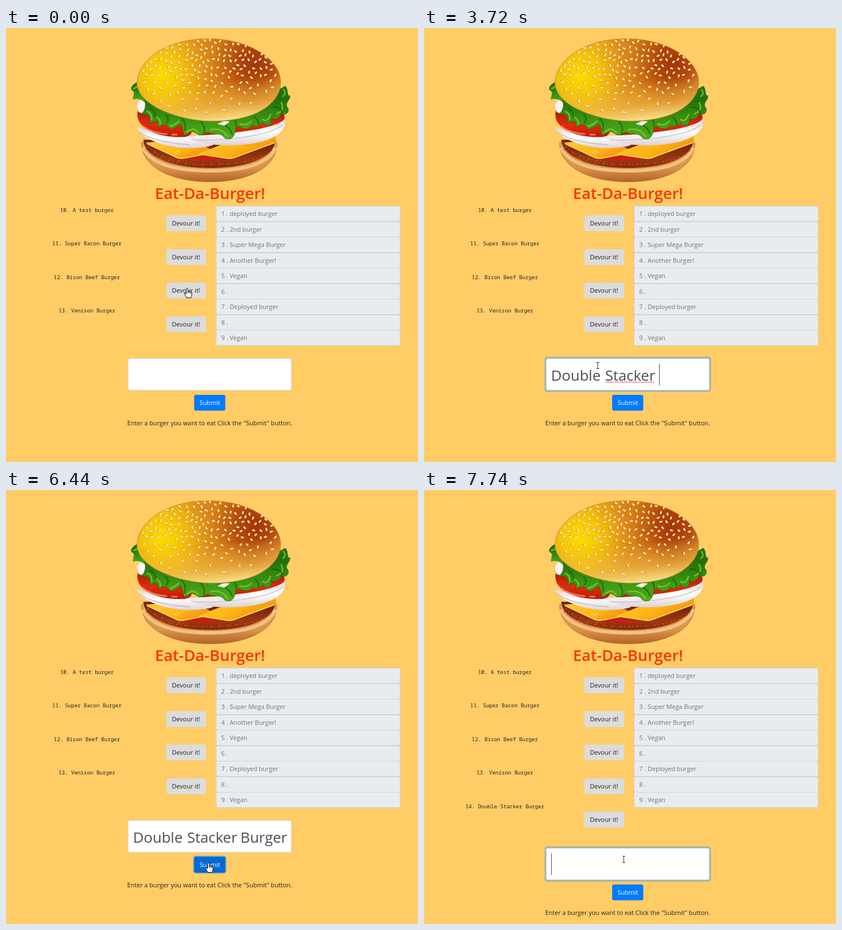
These frames come from a looping animation (729 by 769 pixels, 8000 ms). An HTML page:

```html
<!DOCTYPE html>
<html lang="en">
<head>
<meta charset="utf-8">
<title>Eat-Da-Burger!</title>
<style>
  html, body { margin: 0; width: 100%; height: 100%; overflow: hidden; background: #ffcc66; }
  svg { display: block; width: 729px; height: 769px; }
  text { font-family: "Open Sans", "Noto Sans", sans-serif; font-size: 11.04px; fill: #212529; white-space: pre; }
  text.title { font-size: 27.7px; font-weight: 600; fill: #ff3300; }
  text.mono { font-family: "Noto Sans Mono", "DejaVu Sans Mono", monospace; font-size: 9.3px; }
  text.item { fill: #6c757d; }
  text.typed { font-size: 26px; fill: #495057; }
  .mid { text-anchor: middle; }
</style>
</head>
<body>
<svg id="stage" viewBox="0 0 729 769" xmlns="http://www.w3.org/2000/svg">
  <defs>
    <linearGradient id="crust" x1="0" x2="1" y1=".6" y2=".5">
      <stop offset="0" stop-color="#e3a02c"/><stop offset=".2" stop-color="#efb51c"/>
      <stop offset=".5" stop-color="#dc8a18"/><stop offset=".8" stop-color="#c4600f"/>
      <stop offset="1" stop-color="#d8862c"/>
    </linearGradient>
    <radialGradient id="glow" gradientUnits="userSpaceOnUse" cx="276" cy="84" r="85">
      <stop offset="0" stop-color="#fbdc00"/><stop offset=".4" stop-color="#f8cd00" stop-opacity=".8"/>
      <stop offset="1" stop-color="#f5b800" stop-opacity="0"/>
    </radialGradient>
    <radialGradient id="toast" gradientUnits="userSpaceOnUse" cx="442" cy="62" r="78">
      <stop offset="0" stop-color="#a33407"/><stop offset=".4" stop-color="#ab3f09" stop-opacity=".8"/>
      <stop offset="1" stop-color="#c05a10" stop-opacity="0"/>
    </radialGradient>
    <linearGradient id="pale" gradientUnits="userSpaceOnUse" x1="352" x2="360" y1="98" y2="165">
      <stop offset="0" stop-color="#f5c040" stop-opacity="0"/>
      <stop offset=".6" stop-color="#f0bc4a" stop-opacity=".6"/>
      <stop offset="1" stop-color="#f8dc84"/>
    </linearGradient>
    <linearGradient id="base" x2="0" y2="1">
      <stop offset="0" stop-color="#e0a055"/><stop offset=".65" stop-color="#dc924a"/>
      <stop offset="1" stop-color="#b2642c"/>
    </linearGradient>
    <linearGradient id="meat" x2="0" y2="1">
      <stop offset=".2" stop-color="#7a2409"/><stop offset=".7" stop-color="#9c3810"/>
      <stop offset="1" stop-color="#84280a"/>
    </linearGradient>
    <linearGradient id="cheese" x2="1" y2=".6">
      <stop offset="0" stop-color="#ffcf3a"/><stop offset=".6" stop-color="#ffb515"/>
      <stop offset="1" stop-color="#f08f08"/>
    </linearGradient>
    <linearGradient id="tomato" x2="0" y2="1">
      <stop offset="0" stop-color="#9c1405"/><stop offset=".6" stop-color="#e42a0e"/>
      <stop offset="1" stop-color="#bf1a06"/>
    </linearGradient>
    <linearGradient id="onion" x2="0" y2="1">
      <stop offset="0" stop-color="#d9d0d6"/><stop offset=".5" stop-color="#ffffff"/>
      <stop offset="1" stop-color="#dcd2d8"/>
    </linearGradient>
    <linearGradient id="leaf" x2="0" y2="1">
      <stop offset=".25" stop-color="#24700a"/><stop offset=".7" stop-color="#3f9a14"/>
      <stop offset="1" stop-color="#55aa1c"/>
    </linearGradient>
  </defs>
  <rect width="729" height="769" fill="#ffcc66"/>

  <g id="burger">
    <path fill="url(#base)" stroke="#a8642c" stroke-width=".8" d="M240 203C239 245 290 272.5 361 272.5S481 245 479 203Z"/>
    <path fill="none" stroke="#f0c282" stroke-width="6" d="M242 212C258 245 312 253 361 253S462 245 477 212"/>
    <path fill="url(#meat)" d="M243 198C246 232 300 248 361 248S475 232 477 198Z"/>
    <path fill="none" stroke="#c05526" stroke-width="2.500" stroke-dasharray="5 3 2 5" opacity=".7" d="M247 214C266 238 320 243 361 242S456 238 473 214M250 209C270 230 300 235 320 237"/>
    <path fill="#c9200a" d="M308 232L350 218L386 231Q348 238 308 232Z"/>
    <path fill="url(#cheese)" d="M247 203L302 230Q308 233 318 231L372 220L330 198Z"/>
    <path fill="none" stroke="#ffe070" stroke-width="1.500" d="M249 205L303 230Q309 232 318 230L350 224M296 219l8 4M302 217l7 4"/>
    <path fill="url(#cheese)" d="M340 223L392 231.500Q400 233 408 229L478 203L476 186L398 200Z"/>
    <path fill="none" stroke="#ffe070" stroke-width="1.500" d="M342 223.500L392 231Q400 232 408 228L476 203"/>
    <path fill="url(#onion)" d="M231 174C236 197 290 217 340 212C374 210 375 203 360 190C310 194 255 186 231 174Z"/>
    <path fill="none" stroke="#b9adb2" stroke-width="1.200" d="M236 184Q262 203 326 207"/>
    <path fill="url(#tomato)" d="M233 148C227 178 270 196 318 193C334 190 331 172 322 164L240 138Z"/>
    <path fill="none" stroke="#ff8a68" stroke-width="3" stroke-linecap="round" opacity=".8" d="M242 174Q258 186 284 188M294 189l8 0"/>
    <path fill="url(#tomato)" d="M340 190C430 190 493 175 493 158L490 146L400 160Z"/>
    <path fill="url(#onion)" d="M318 192C340 209 400 211 440 204C480 197 497 180 494 161C478 176 430 186 318 192Z"/>
    <path fill="none" stroke="#c3b8bf" stroke-width="1.200" d="M328 198C380 201 462 193 490 172"/>
    <path fill="#faf5f3" stroke="#d9cfca" stroke-width=".7" d="M231 136L240 125L266 140L252 154L235 149Z"/>
    <path fill="url(#leaf)" d="M238 94C228 96 219 104 222 110C231 114 223 121 225 127C233 124 240 126 248 134L240 96Z"/>
    <path id="frill" fill="url(#leaf)" stroke="#236a08" stroke-width=".8" d="M244 120C248 136 248 146 238 153C250 152 258 154 253 170C264 162 272 164 268 176C278 170 284 168 290 179C296 180 303 174 309 170C315 178 312 187 317 190C325 182 331 182 339 188C347 192 352 186 358 184C366 192 378 182 387 195C395 199 402 196 405 186C408 182 402 178 412 174C420 180 430 181 436 172C442 177 450 174 454 167C460 176 472 174 469 160C477 164 486 160 487 151C494 156 502 150 499 142C491 133 504 128 502 120C496 121 500 108 494 103Q484 110 470 112Z"/>
    <path fill="none" stroke="#86cf38" stroke-width="2.500" stroke-linecap="round" opacity=".75" d="M250 148Q258 150 258 162M266 158Q274 162 273 170M291 174Q300 171 306 165M321 184Q332 174 340 185M362 180Q382 176 392 192M414 170Q426 174 434 165M454 162Q463 168 468 153M479 152Q494 146 487 132M490 121Q497 116 491 109M226 107Q231 106 234 101"/>
    <path fill="none" stroke="#165c05" stroke-width="2.500" stroke-linecap="round" opacity=".65" d="M255 142Q266 150 264 158M283 154Q290 162 284 168M311 160Q320 170 316 182M345 166Q354 176 350 186M376 168Q397 174 400 188M404 162Q408 168 407 175M440 158Q448 164 447 172M472 140Q486 140 489 150"/>
    <path fill="#f8f2ee" d="M374 170Q386 163 396 166L386 173Z"/>
    <g id="bun"></g>
  </g>

  <g id="page">
    <text class="title mid" x="361" y="303">Eat-Da-Burger!</text>
    <g id="rows"></g>
    <g id="list"></g>
  </g>

  <g id="form">
    <rect id="ring" x="213.300" y="582.400" width="294.500" height="62.600" rx="5" fill="#007bff" fill-opacity=".3"/>
    <rect id="field" x="216" y="585.500" width="289" height="56.500" rx="3" fill="#fff"/>
    <text id="typed" class="typed" y="625"></text>
    <path id="squiggle" fill="none" stroke="#e0333c" stroke-width="1"/>
    <rect id="caret" y="595" width="1" height="38" fill="#495057"/>
    <rect id="halo" x="331" y="648" width="59" height="31.500" rx="5" fill="#007bff" fill-opacity=".5"/>
    <rect id="submit" x="333" y="650" width="55" height="28" rx="3"/>
    <text class="mid" x="360.700" y="668" style="fill:#fff">Submit</text>
    <text x="214.500" y="703.700">Enter a burger you want to eat Click the "Submit" button.</text>
  </g>

  <g id="pointer">
    <path id="hand" fill="#fff" stroke="#000" stroke-width="1" stroke-linejoin="round" d="M-2 1.500Q-2 0-.5 0T1 1.500V6Q2 5 3.300 5.600Q4 5 5.600 6.200Q7.500 5.800 7.700 7.800V12Q7.500 14 6.300 17H-1.500Q-2.500 14-5.500 10.500Q-6 8.500-4 9L-2 10.500ZM1 6V9M3.300 6V9M5.600 6.500V9"/>
    <path id="arrow" fill="#fff" stroke="#000" stroke-width=".9" d="M0 0V14L3.200 11L5.500 16L7.600 15L5.400 10.200H10Z"/>
    <path id="beam" fill="none" stroke="#333" stroke-width="1" d="M-2.500-5.500H2.500M0-5.500V5.500M-2.500 5.500H2.500"/>
  </g>
</svg>
<script>
const LOOP = 8000;
const $ = id => document.getElementById(id);

function add(parent, tag, attrs, text) {
  const el = document.createElementNS("http://www.w3.org/2000/svg", tag);
  for (const k in attrs) el.setAttribute(k, attrs[k]);
  if (text) el.textContent = text;
  parent.appendChild(el);
  return el;
}
const show = (el, on) => el.setAttribute("visibility", on ? "visible" : "hidden");
const move = (el, x, y) => el.setAttribute("transform", `translate(${x} ${y})`);
const mix = (a, b, k) => `rgb(${a.map((v, i) => Math.round(v + (b[i] - v) * k))})`;

// latest entry whose time has come
function at(keys, t) {
  let hit = keys[0];
  for (const k of keys) if (k[0] <= t) hit = k;
  return hit;
}

function buildBun() {
  const dome = "M232 100C230 60 280 19 358 19S488 60 486 98C485 120 468 140 440 152C415 162 390 165 362 165C310 164 236 140 232 100Z";
  for (const id of ["crust", "toast", "glow", "pale"]) add($("bun"), "path", { d: dome, fill: `url(#${id})` });
  add($("bun"), "path", { d: dome, fill: "none", stroke: "#c98a34", "stroke-width": 1 });

  let seed = 11;
  const rnd = () => (seed = (seed * 16807) % 2147483647) / 2147483647;
  const seeds = [];
  for (let i = 0; i < 4000; i++) {
    const x = 238 + rnd() * 242, y = 21 + rnd() * 132, turn = rnd() * 180;
    if (((x - 359) / 120) ** 2 + ((y - 86) / 65) ** 2 > 1) continue;
    const gap = y > 115 ? 17 : y > 85 ? 11 : 8.5;
    if (seeds.some(s => Math.hypot(s[0] - x, s[1] - y) < gap)) continue;
    seeds.push([x, y]);
    const g = add($("bun"), "g", { transform: `translate(${x} ${y}) rotate(${turn})` });
    add(g, "ellipse", { cx: .4, cy: .6, rx: 3.3, ry: 1.9, fill: "#8a4508", "fill-opacity": .4 });
    add(g, "ellipse", { rx: 3, ry: 1.6, fill: "#fae3b0" });
  }
}

function buildPage() {
  const todo = ["A test burger", "Super Bacon Burger", "Bison Beef Burger", "Venison Burger", "Double Stacker Burger"];
  todo.forEach((name, i) => {
    const g = add($("rows"), "g", {}), y = i * 59.5;
    add(g, "text", { class: "mono mid", x: 143.2, y: 325.7 + y }, `${10 + i}. ${name}`);
    add(g, "rect", { x: 284, y: Math.floor(332.5 + y), width: 70, height: 28, rx: 3, fill: "#dcdcdc" });
    add(g, "text", { x: 293.5, y: 350.3 + y }, "Devour it!");
  });
  const done = ["deployed burger", "2nd burger", "Super Mega Burger", "Another Burger!", "Vegan", "", "Deployed burger", "", "Vegan"];
  done.forEach((name, i) => {
    const y = i * 27.5;
    add($("list"), "rect", { x: 372, y: Math.round(315 + y) + .5, width: 325.3, height: 27, rx: 2.5, fill: "#e9ecef", stroke: "#ced4da" });
    add($("list"), "text", { class: "item", x: 380.7, y: 333 + y }, `${i + 1} . ${name}`);
  });
  let d = "M321 628";
  for (let x = 323; x <= 408; x += 2) d += `L${x} ${x % 4 === 3 ? 626.5 : 628.5}`;
  $("squiggle").setAttribute("d", d);
}

const PHRASE = "Double Stacker Burger";
const WORD_X = [224.8, 320.4, 414.8];

// time, letters typed, caret x
const TYPING = [
  [0, 0, 225], [1320, 1, 244], [1530, 2, 260], [1610, 3, 276], [1840, 4, 292], [1920, 5, 299],
  [2000, 6, 313], [2300, 7, 320], [2550, 8, 335], [2850, 9, 344], [3080, 10, 357], [3250, 11, 369],
  [3320, 12, 384], [3490, 13, 399], [3640, 14, 409], [3720, 15, 416], [3950, 16, 431], [4560, 17, 448],
  [4640, 18, 457], [4870, 20, 487], [5180, 21, 495], [6900, 0, 225]
];
const CARET = [[0, 0], [540, 1], [1070, 0], [1320, 1], [4410, 0], [4560, 1], [5650, 0], [6200, 1], [6360, 0], [7590, 1]];
const FOCUS = [[0, 0], [540, .3], [610, .7], [690, 1], [6360, .4], [6440, 0], [7590, .3], [7660, .7], [7740, 1]];
const HOVER = [[0, 0], [6200, .5], [6280, 1], [6900, 0]];
const PRESS = [[0, 0], [6360, .6], [6440, 1], [6900, 0]];

// time, x, y, shape
const POINTER = [
  [0, 321, 461, "hand"], [70, 320.5, 465, "hand"], [150, 318, 491, "arrow"], [220, 312, 550, "arrow"],
  [300, 308.5, 590, "beam"], [370, 307.5, 598, "beam"],
  [5800, 308.5, 600, "beam"], [5880, 314.5, 608, "beam"], [5960, 325.5, 622, "beam"], [6040, 338.5, 637, "beam"],
  [6120, 348, 648, "arrow"], [6200, 355, 657, "hand"], [6280, 358.5, 660.5, "hand"],
  [7050, 356.5, 658, "beam"], [7210, 355.5, 656, "beam"], [7280, 353.5, 654.5, "beam"]
];

let shown = null;
function type(str) {
  if (str === shown) return;
  shown = str;
  $("typed").textContent = "";
  str.split(" ").forEach((w, i) => w && add($("typed"), "tspan", { x: WORD_X[i] }, w));
}

function draw(t) {
  const reloaded = t >= 6900;
  const bare = reloaded && t < 6980;
  const lift = bare ? -239 : 0;
  show($("burger"), !bare);
  show($("rows").lastChild, reloaded);
  move($("page"), 0, lift);
  move($("form"), 0, lift + (reloaded ? 49 : 0));

  const [, count, x] = at(TYPING, t);
  type(PHRASE.slice(0, count));
  $("caret").setAttribute("x", x);
  show($("caret"), at(CARET, t)[1]);
  show($("squiggle"), t >= 3720 && t < 6360);

  const focus = at(FOCUS, t)[1];
  $("ring").setAttribute("opacity", focus);
  $("field").setAttribute("stroke", mix([206, 212, 218], [128, 189, 255], focus));
  $("halo").setAttribute("opacity", at(PRESS, t)[1]);
  $("submit").setAttribute("fill", mix([0, 123, 255], [0, 105, 217], at(HOVER, t)[1]));

  const [, px, py, shape] = at(POINTER, t);
  move($("pointer"), px, py);
  for (const id of ["hand", "arrow", "beam"]) show($(id), id === shape);
}

buildBun();
buildPage();
const start = performance.now();
function tick() {
  draw((performance.now() - start) % LOOP);
  requestAnimationFrame(tick);
}
tick();
</script>
</body>
</html>
```
